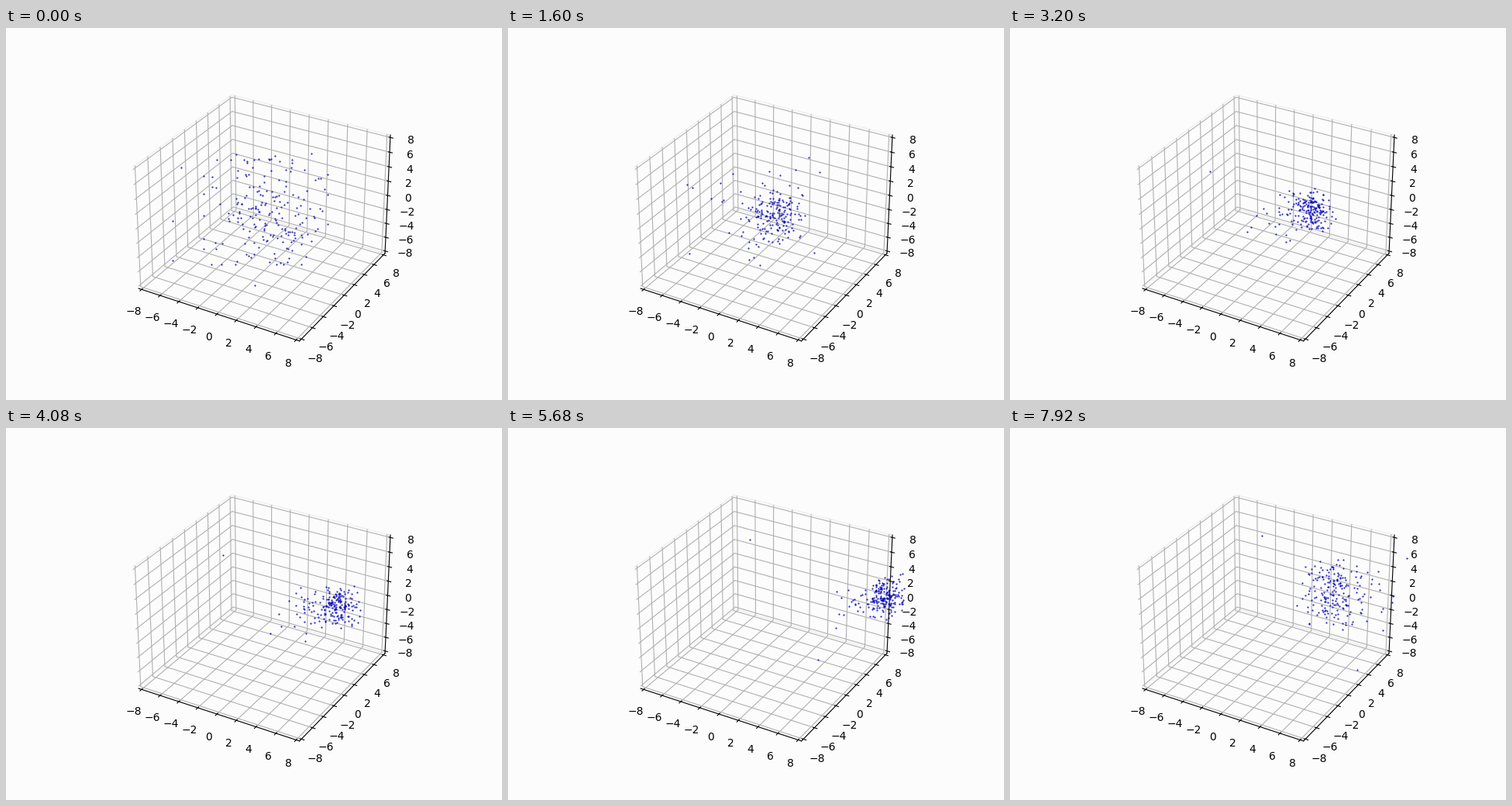
A matplotlib script that plays this animation: 640x480 px, repeating every 8 s.

```python
import numpy as np
import matplotlib.pyplot as plt
from matplotlib.animation import FuncAnimation
from matplotlib.lines import Line2D
from matplotlib.transforms import IdentityTransform

WIDTH, HEIGHT, DPI = 640, 480, 100
FRAMES, INTERVAL = 100, 80
PAPER = "#fcfcfc"

# A few waypoints in stage pixels (y down), at these seconds.
TIMES = np.array([0, 2.2, 4.1, 5.7, 6.9, 8.0])
CENTRE = [(335, 237), (353, 240), (427, 230), (488, 218), (459, 211), (412, 212)]
HIGH_LONER = [(226, 180), (237, 203), (280, 164), (312, 144), (334, 130), (324, 140)]
LOW_LONER = [(321, 332), (323, 286), (386, 275), (401, 299), (453, 318), (448, 312)]


def glide(t, points):
    """Cubic Hermite curve through the waypoints."""
    points = np.asarray(points, float)
    slopes = np.gradient(points, TIMES, axis=0)
    t = np.clip(np.atleast_1d(t), 0, TIMES[-1])
    k = np.clip(np.searchsorted(TIMES, t, side="right") - 1, 0, len(TIMES) - 2)
    step = (TIMES[k + 1] - TIMES[k])[:, None]
    s = (t - TIMES[k])[:, None] / step
    return ((1 + 2 * s) * (1 - s) ** 2 * points[k]
            + s * (1 - s) ** 2 * step * slopes[k]
            + s ** 2 * (3 - 2 * s) * points[k + 1]
            + s ** 2 * (s - 1) * step * slopes[k + 1])


def spread(t):
    """The swarm contracts early and loosens again when it turns back."""
    t = np.maximum(t, 0)[:, None]
    contract = np.exp(-(t / 1.35) ** 2)
    turn = np.clip((t - 5.6) / 1.3, 0, 1)
    loosen = turn ** 2 * (3 - 2 * turn)
    return 12 + contract * [30, 24] + loosen * [7, 10]


rng = np.random.default_rng(12)
CORE, STRAYS = 174, 24
COUNT = CORE + STRAYS
cos_part, sin_part = np.clip(rng.normal(size=(2, COUNT, 2)), -1.9, 1.9)
speed = rng.uniform(0.4, 1.2, (COUNT, 1))
reach = np.where(np.arange(COUNT)[:, None] < CORE, 1.0, [1.5, 1.1])
# Strays follow the swarm late, so they trail behind it.
lag = np.concatenate([rng.exponential(0.2, CORE) - 0.2,
                      rng.uniform(0.6, 1.5, STRAYS)])


def positions(t):
    orbit = cos_part * np.cos(speed * t) + sin_part * np.sin(speed * t)
    swarm = glide(t - lag, CENTRE) + reach * spread(t - lag) * orbit
    return np.vstack([swarm, glide(t, HIGH_LONER), glide(t, LOW_LONER)])


fig = plt.figure(figsize=(WIDTH / DPI, HEIGHT / DPI), dpi=DPI, facecolor=PAPER)
ax = fig.add_subplot(projection="3d", facecolor=PAPER)
limit = 8 * 25 / 24
ax.set(xlim=(-limit, limit), ylim=(-limit, limit), zlim=(-limit, limit))
for axis in (ax.xaxis, ax.yaxis, ax.zaxis):
    axis.set_ticks(range(-8, 9, 2))
    axis.set_pane_color(PAPER)
    axis.pane.set_edgecolor("#f0f0f0")

dots = Line2D([], [], color="#0000b8", marker=".", markersize=1, linestyle="",
              transform=IdentityTransform(), zorder=5)
ax.add_artist(dots)


def update(frame):
    x, y = positions(frame * INTERVAL / 1000).T
    dots.set_data(x, HEIGHT - y)
    return [dots]


anim = FuncAnimation(fig, update, frames=FRAMES, interval=INTERVAL,
                     repeat=True, repeat_delay=0)
plt.show()
```
